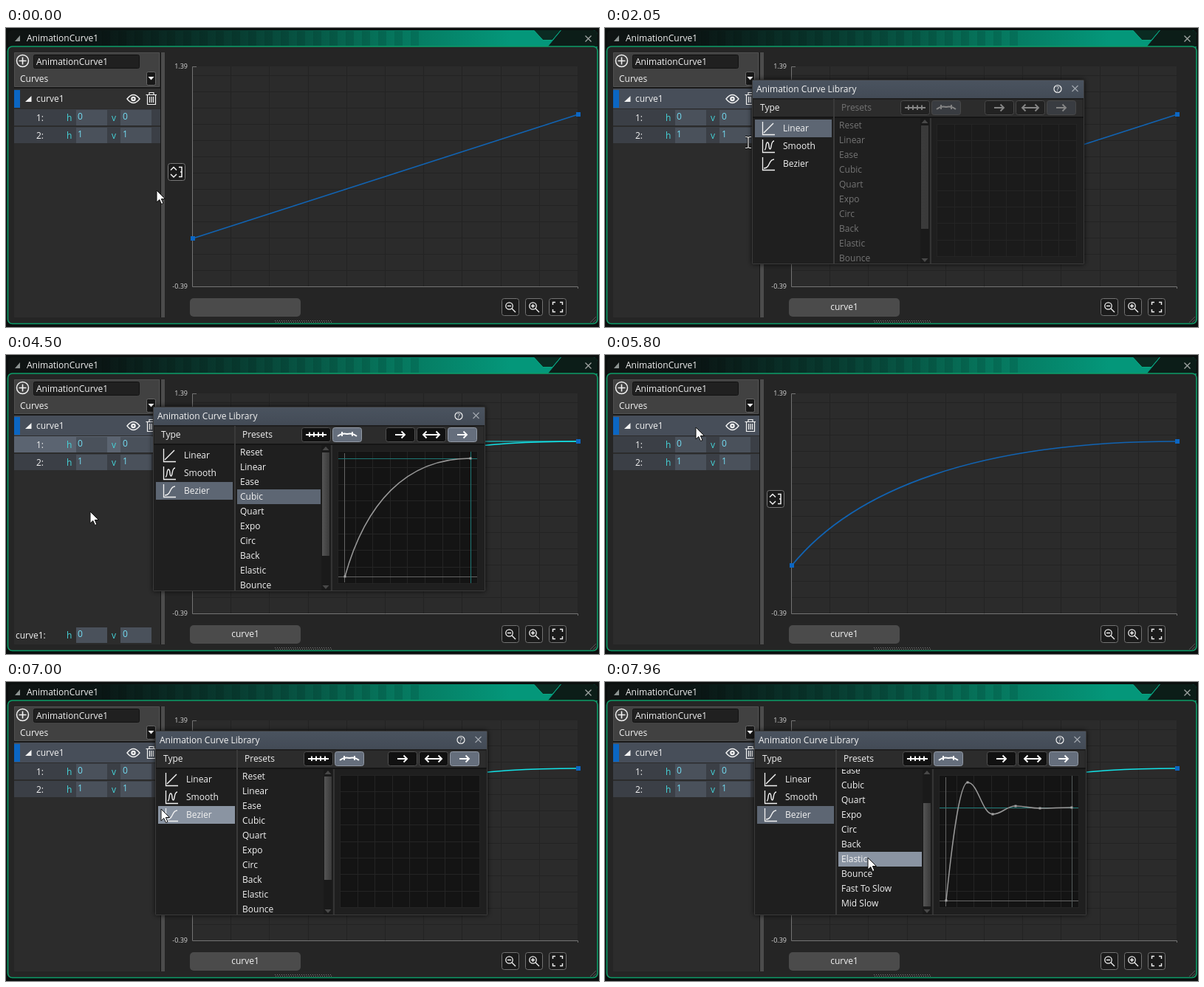
An HTML page with a canvas that plays this animation: 803x405 px, repeating every 8 s.

```html
<!DOCTYPE html>
<html lang="en">
<head>
<meta charset="utf-8">
<title>Curve editor</title>
<style>
html, body { margin: 0; width: 100%; height: 100%; overflow: hidden; background: #0b0f0e; }
canvas { display: block; }
</style>
</head>
<body>
<canvas id="stage" width="803" height="405"></canvas>
<script>
const c = document.getElementById('stage').getContext('2d');
const LOOP = 8000, WHITE = '#f2f2f2', BLUE = '#0b66c3', CYAN = '#12e3e8';

// Moments at which clicks change the state
const OPEN = 1430, BEZIER = 2400, PICK = 3760, CLOSE = 4550, REOPEN = 6430;

// Pointer path: time, x, y
const pointerKeys = [
  [40, 204, 220], [540, 115, 94], [790, 115, 94], [1330, 199, 70], [1770, 199, 70],
  [2050, 194, 155], [2340, 212, 179], [2970, 212, 179], [3200, 314, 188], [3430, 338, 191],
  [4040, 338, 191], [4480, 114, 212], [5240, 114, 212], [5800, 123, 98], [6030, 169, 88],
  [6080, 169, 88], [6380, 202, 66], [6720, 202, 66], [7000, 210, 172], [7270, 345, 192],
  [7560, 345, 197], [7940, 356, 238]
];
const presets = ['Reset', 'Linear', 'Ease', 'Cubic', 'Quart', 'Expo', 'Circ', 'Back',
  'Elastic', 'Bounce', 'Fast To Slow', 'Mid Slow'];
const STRAIGHT = [0, 0, 1, 1], SOFT = [.1, 0, .9, 1], CUBIC = [.16, .61, .48, 1];
const handles = {
  Reset: SOFT, Linear: STRAIGHT, Ease: [.25, .1, .25, 1], Cubic: CUBIC, Quart: [.165, .84, .44, 1],
  Expo: [.19, 1, .22, 1], Circ: [.075, .82, .165, 1], Back: [.175, .885, .32, 1.05]
};

const smooth = u => u * u * (3 - 2 * u);
const clamp = u => Math.max(0, Math.min(1, u));

function pointerAt(t) {
  let a = pointerKeys[0];
  for (const b of pointerKeys) {
    if (t < b[0]) {
      const u = smooth(clamp((t - a[0]) / (b[0] - a[0] || 1)));
      return [a[1] + (b[1] - a[1]) * u, a[2] + (b[2] - a[2]) * u];
    }
    a = b;
  }
  return [a[1], a[2]];
}

function box(x, y, w, h, fill, border, r = 0) {
  c.beginPath();
  const o = border ? .5 : 0;
  c.roundRect(x + o, y + o, w - 2 * o, h - 2 * o, r);
  if (fill) { c.fillStyle = fill; c.fill(); }
  if (border) { c.strokeStyle = border; c.lineWidth = 1; c.stroke(); }
}
function text(s, x, y, color = WHITE, size = 12, align = 'left') {
  c.font = size + 'px "Open Sans", "Noto Sans", sans-serif';
  c.textAlign = align;
  c.fillStyle = color;
  c.fillText(s, x, y);
}
function draw(d, color, width = 1, x = 0, y = 0) {
  c.save();
  c.translate(x, y);
  c.strokeStyle = color;
  c.lineWidth = width;
  c.stroke(new Path2D(d));
  c.restore();
}
function fillPath(d, color, x = 0, y = 0) {
  c.save();
  c.translate(x, y);
  c.fillStyle = color;
  c.fill(new Path2D(d));
  c.restore();
}
function gradient(x0, y0, x1, y1, ...stops) {
  const g = c.createLinearGradient(x0, y0, x1, y1);
  stops.forEach(([at, color]) => g.addColorStop(at, color));
  return g;
}
function circle(x, y, r, color, width = 1) {
  c.beginPath();
  c.arc(x, y, r, 0, 7);
  c.strokeStyle = color;
  c.lineWidth = width;
  c.stroke();
}
// Bezier through the corners of a plot, with handles given as fractions
function easeCurve([ax, ay, bx, by], x0, y0, x1, y1, color, width) {
  const X = u => x0 + (x1 - x0) * u, Y = u => y0 + (y1 - y0) * u;
  draw(`M${x0} ${y0}C${X(ax)} ${Y(ay)} ${X(bx)} ${Y(by)} ${x1} ${y1}`, color, width);
}

function frame() {
  box(0, 0, 803, 405, '#0b0f0e');
  box(3, 3, 798, 30, gradient(0, 0, 803, 0, [0, '#101413'], [.14, '#0b1413'], [.4, '#083f33'],
    [.62, '#067058'], [.85, '#04977a'], [1, '#04977a']), null, 6);
  for (let x = 130; x < 560; x += 22) box(x, 4, 11, 20, 'rgba(0,0,0,.1)');
  fillPath('M752 3H795Q801 3 801 9V25H734Z', '#0c1d18');
  fillPath('M715 3L727 16H740L751 3Z', '#0a2b22');
  draw('M715 3.5L727 16.5H740L751 3.5', '#0ba883', 1);
  box(2, 25, 800, 376, '#252525', null, 5);
  c.beginPath();
  c.roundRect(2.5, 25, 798.5, 375.5, 6);
  c.strokeStyle = '#0c9d68';
  c.lineWidth = 1.6;
  c.stroke();
  fillPath('M19 10V18H12Z', '#8c9391');
  text('AnimationCurve1', 28, 18);
  draw('M784.500 10.500L792.500 18.500M792.500 10.500L784.500 18.500', '#a0a5a3', 1.3);
  for (let i = 0; i < 26; i++) {
    box(364 + i * 3, 396, 1, 1, '#777');
    box(365 + i * 3, 398, 1, 1, '#777');
  }
  draw('M791 399L799 391M795 399L799 395', '#555');
}

function pointRow(y, label, value, fill) {
  box(11, y, 198, 22, fill);
  text(label, 41, y + 16);
  numberFields(y + 1, value);
}
function numberFields(y, value) {
  [['h', 82], ['v', 143]].forEach(([name, x]) => {
    text(name, x, y + 15, '#45d3d8');
    box(x + (name === 'h' ? 13 : 12), y, 42, 21, '#4a515b');
    text(value, x + 15, y + 13, '#73dcf2');
  });
}

function sidebar(active, selected) {
  box(11, 33, 198, 359, '#2c2c2c');
  box(11, 33, 197, 47, '#414141', '#505050');
  circle(22.5, 44.5, 8, WHITE, 1.5);
  draw('M17.500 44.500H27.500M22.500 39.500V49.500', WHITE, 1.6);
  box(37, 36, 144, 19, '#202020', '#121212', 2);
  text('AnimationCurve1', 41, 50);
  text('Curves', 19, 73);
  box(190, 59, 13, 19, '#181818', '#666', 2);
  fillPath('M192.500 66H200.500L196.500 70.500Z', WHITE);

  box(11, 80, 198, 2, '#191919');
  box(11, 82, 198, 27, active ? '#474e59' : '#303030');
  box(11, 84, 8, 24, BLUE);
  fillPath('M34.500 92V100H26Z', WHITE);
  text('curve1', 41, 100);
  draw('M164 96Q172.500 85 181 96Q172.500 107 164 96Z', WHITE, 1.4);
  circle(172.5, 96, 2.2, WHITE, 2.2);
  draw('M189.500 90.500H204M194 90V87.500H200V90M191.500 91V103.500H202.500V91M194.500 93V101M197 93V101M199.500 93V101', WHITE, 1.2);

  pointRow(110, '1:', '0', selected ? '#5b6471' : '#3b3f46');
  pointRow(134, '2:', '1', '#3b3f46');
  if (selected) {
    text('curve1:', 13, 384);
    numberFields(369, '0');
  }
  box(209, 33, 1, 359, '#161616');
  box(210, 33, 5, 359, '#4c4c4c');
}

function chart(t, active, selected) {
  box(253, 52, 522, 298, '#2b2b2b');
  for (let i = 1; i <= 10; i++) box(Math.round(252 + 52.2 * i), 52, 1, 298, '#232323');
  for (let y = 65; y < 350; y += 22) box(253, y - 1, 522, 1, '#232323');
  draw('M258 52.500H252.500V350.500H774.500V353', '#747474');
  text('1.39', 246, 55, '#d8d8d8', 9, 'right');
  text('-0.39', 246, 353, '#d8d8d8', 9, 'right');

  const bright = t >= BEZIER && t < CLOSE || t >= REOPEN;
  const shape = t < BEZIER ? STRAIGHT : t < PICK ? SOFT : CUBIC;
  easeCurve(shape, 253, 285, 775, 117, bright ? CYAN : '#1163b2', 1.7);
  if (selected) draw('M253 285L336 182M504 117H775', CYAN, 1);
  box(250, 282, 6, 6, BLUE);
  box(772, 114, 6, 6, BLUE);

  box(219, 183, 24, 24, '#1b1b1b', '#777', 3);
  draw('M223 192.500L227 188.500L231 192.500M223 198L227 202L231 198M234 188.500H238V201.500H234M236 195H238', WHITE, 1.5);
  box(249, 366, 150, 25, '#4b4b4b', null, 5);
  if (active) text('curve1', 324, 382, WHITE, 12, 'center');
  [671, 703, 735].forEach((x, i) => {
    box(x, 366, 24, 24, '#1b1b1b', '#737373', 3);
    if (i < 2) {
      circle(x + 10.5, 376.5, 4.7, WHITE, 1.3);
      draw('M14 14L19 19M8 10.500H13' + (i ? 'M10.500 8V13' : ''), WHITE, 1.4, x, 366);
    } else draw('M5.500 9V5.500H9M15 5.500H18.500V9M18.500 15V18.500H15M9 18.500H5.500V15', WHITE, 1.4, x, 366);
  });
}

function preview(name, enabled) {
  box(449, 130, 190, 180, enabled ? '#141414' : '#1b1b1b');
  for (let i = 0; i <= 8; i++) {
    box(Math.round(449 + 23.6 * i), 130, 1, 180, '#242424');
    box(449, Math.round(130 + 22.4 * i), 190, 1, '#242424');
  }
  if (!name) return;
  const elastic = name === 'Elastic', top = elastic ? 174 : 140;
  draw('M450 300.500H638M458.500 133V308', '#656565');
  draw(`M450 ${top + .5}H638`, '#1d7775');
  draw('M629.500 131V309', elastic ? '#535b5b' : '#1d7775');
  let dots = [[459, 300], [629, top]];
  if (elastic) {
    const peaks = [[488, 140], [522, 183], [553, 172], [586, 175], [629, 174]];
    let d = 'M459 300C467 222 477 140 488 140';
    peaks.slice(1).forEach(([x, y], i) => {
      const [px, py] = peaks[i], m = (x - px) * .42;
      d += `C${px + m} ${py} ${x - m} ${y} ${x} ${y}`;
    });
    draw(d, '#989898', 1.5);
    dots = [[459, 300], ...peaks];
  } else easeCurve(handles[name] || SOFT, 459, 300, 629, top, '#989898', 1.5);
  dots.forEach(([x, y]) => box(x - 1.5, y - 1.5, 3, 3, '#a5a5a5'));
}

function library(t, pointer) {
  const second = t >= REOPEN, enabled = second || t >= BEZIER;
  const dx = second ? 3 : 0, dy = second ? -4 : 0;
  const px = pointer[0] - dx, py = pointer[1] - dy;
  const scroll = second ? 48 * smooth(clamp((t - 7360) / 140)) : 0;
  const ink = enabled ? WHITE : '#747474';
  c.save();
  c.translate(dx, dy);
  c.shadowColor = 'rgba(0,0,0,.75)';
  c.shadowBlur = 7;
  box(199, 70, 450, 250, '#3b3b3b', null, 2);
  c.shadowBlur = 0;
  c.shadowColor = 'transparent';
  box(200, 71, 448, 24, gradient(0, 71, 0, 95, [0, '#4a535f'], [1, '#434b56']));
  text('Animation Curve Library', 205, 86.5);
  circle(613, 82.500, 5, WHITE, 1.2);
  text('?', 613, 86, WHITE, 9, 'center');
  draw('M632.500 78L640.500 86M640.500 78L632.500 86', '#a2a8af', 1.2);

  box(200, 95, 448, 224, '#1f1f1f');
  box(201, 97, 108, 23, '#2b2b2b');
  box(311, 97, 336, 23, '#2c2c2c');
  box(200, 120, 448, 2, '#151515');
  box(309, 96, 2, 223, '#3a3a3a');
  box(440, 122, 2, 197, '#343434');
  text('Type', 210, 112);
  text('Presets', 320, 112, ink);

  const curves = ['M3 15L16 2', 'M4 14C7 14 5 4 8 4C11 4 9 13 11.500 13C14 13 12 2 17 2', 'M3 15C12 15 9 3 17 3'];
  ['Linear', 'Smooth', 'Bezier'].forEach((name, i) => {
    const y = 124 + 24 * i;
    const hover = px >= 203 && px < 307 && py >= y && py < y + 24;
    if (hover) box(203, y, 104, 24, '#8a94a2');
    else if (i === (enabled ? 2 : 0)) box(203, y, 104, 24, '#5d6673');
    draw('M1.500 0V17.500H18', WHITE, 1.3, 212, y + 3);
    draw(curves[i], WHITE, 1.4, 212, y + 3);
    text(name, 241, y + 16);
  });

  const arrows = ['M6 10H34M11 6.500V13M17 6.500V13M23 6.500V13M29 6.500V13',
    'M7 12Q13 7 20 9Q27 7 33 12M13 6V12M27 6V12',
    'M13 10H26M21.500 5.500L26 10L21.500 14.500', 'M9 10H31M13.500 5.500L9 10L13.500 14.500M26.500 5.500L31 10L26.500 14.500',
    'M13 10H26M21.500 5.500L26 10L21.500 14.500'];
  [400, 442, 514, 556, 598].forEach((x, i) => {
    const on = i === 1 || i === 4;
    box(x, 98, 40, 20, on ? (enabled ? '#656e7c' : '#393c41') : (enabled ? '#111' : '#222'),
      enabled ? (on ? '#929aa6' : '#505050') : '#484848', 3);
    draw(arrows[i], enabled ? '#fff' : '#858585', 1.9, x, 98);
  });

  let shown = null;
  c.save();
  c.beginPath();
  c.rect(312, 122, 115, 196);
  c.clip();
  presets.forEach((name, i) => {
    const y = 122 + 20 * i - scroll;
    const hover = enabled && px >= 312 && px < 427 && py >= y && py < y + 20;
    const chosen = !second && t >= PICK && name === 'Cubic';
    if (hover || chosen && !shown) shown = name;
    if (hover) box(313, y, 113, 20, '#8a94a2');
    else if (chosen) box(313, y, 113, 20, '#5d6673');
    text(name, 317, y + 14, ink);
  });
  c.restore();

  box(427, 122, 12, 197, '#1a1a1a');
  box(428, 132 + scroll * .75, 10, 140, gradient(428, 0, 438, 0, [0, enabled ? '#555' : '#3b3b3b'], [1, '#3a3a3a']));
  fillPath('M428.500 129H437.500L433 124Z M428.500 312H437.500L433 317Z', '#484848');
  preview(shown, enabled);
  c.restore();
}

function pointerIcon(t, [x, y]) {
  if (t > 1900 && t < 2180 && x < 199 && y > 110 && y < 170) {
    const beam = 'M-4 -7.500H-1.500L0 -6.500L1.500 -7.500H4M0 -6.500V6.500M-4 7.500H-1.500L0 6.500L1.500 7.500H4';
    draw(beam, '#111', 3, x, y);
    draw(beam, '#eee', 1.2, x, y);
    return;
  }
  const arrow = 'M0 0V16L3.800 12.500L6.500 18.500L9 17.500L6.300 11.500H11.500Z';
  fillPath(arrow, '#fff', x, y);
  draw(arrow, '#111', 1, x, y);
}

function render() {
  const t = performance.now() % LOOP;
  const pointer = pointerAt(t);
  const active = t > 430 && t < CLOSE || t > 5690;
  const selected = t >= PICK && t < CLOSE;
  frame();
  sidebar(active, selected);
  chart(t, active, selected);
  if (t >= OPEN && t < CLOSE || t >= REOPEN) library(t, pointer);
  pointerIcon(t, pointer);
  requestAnimationFrame(render);
}
render();
</script>
</body>
</html>
```
